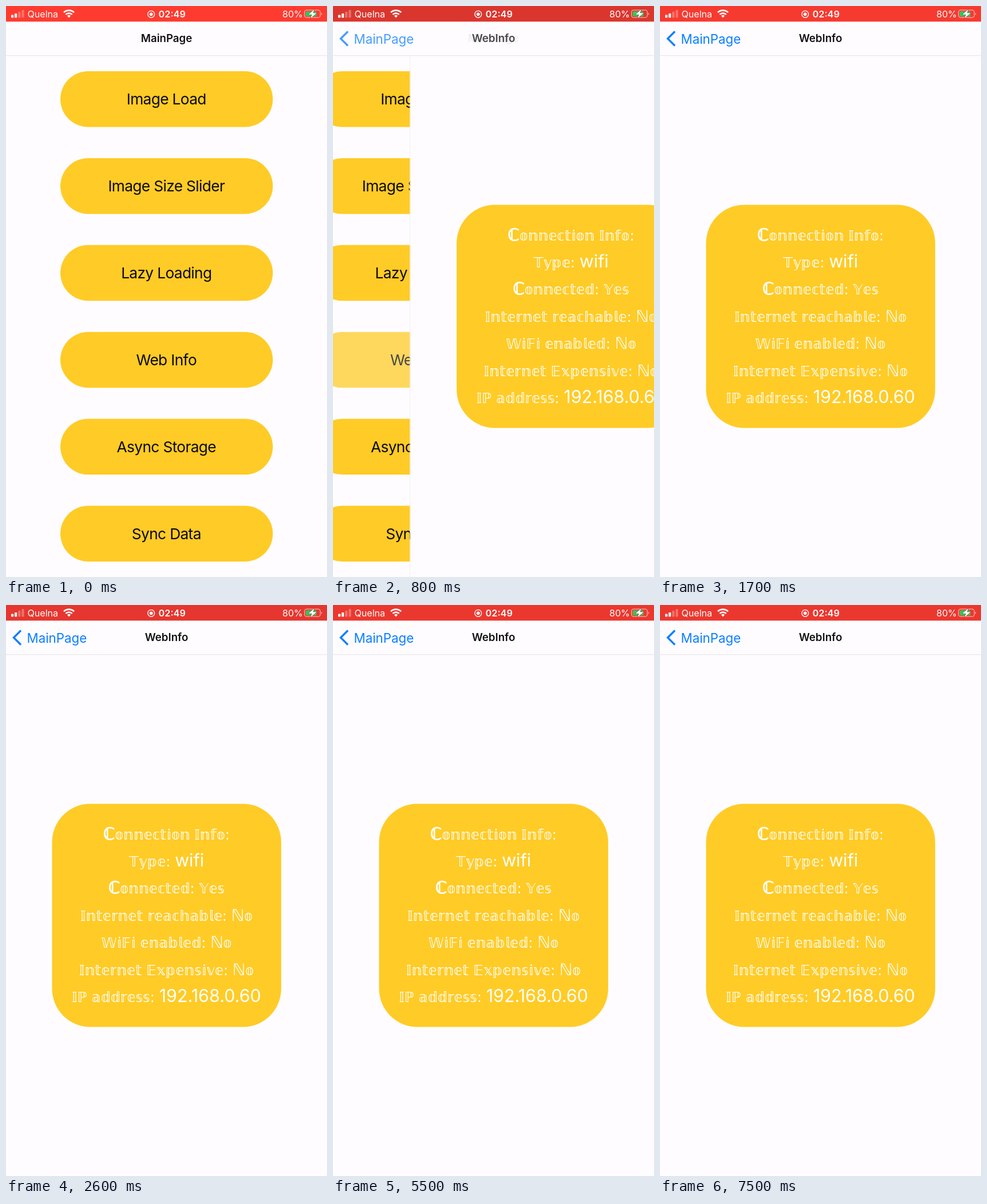
An HTML page that plays this animation: 561x998 px, repeating every 7600 ms.

```html
<!DOCTYPE html>
<html lang="en">
<head>
<meta charset="utf-8">
<title>WebInfo</title>
<style>
  html, body { margin: 0; width: 100%; height: 100%; overflow: hidden; background: #fefcff; }
  svg { display: block; width: 100%; height: 100%; font-family: Inter, "Open Sans", sans-serif; }
  .mid { text-anchor: middle; }
  .label { font-size: 26.3px; letter-spacing: -.65px; fill: #0c0a08; }
  .title { font-size: 18.7px; font-weight: 600; fill: #111; }
  .back { font-size: 22.3px; fill: #0a7eff; }
  .status { font-size: 16.1px; fill: #fff; }
  .clock { font-weight: 600; font-size: 16.3px; }
  .double { font-family: "DejaVu Sans", sans-serif; fill: #fff; }
  .tall { font-size: 28px; }
  .heavy { font-size: 29px; stroke: #fff; stroke-width: 1.2; }
  .plain { font: 30.5px Inter, sans-serif; }
</style>
</head>
<body>
<svg viewBox="0 0 561 998" preserveAspectRatio="none">
  <rect width="561" height="998" fill="#fefcff"/>
  <g id="menu"></g>

  <g id="page">
    <rect x="-1.5" y="87" width="1.5" height="911" fill="#f2f1f3"/>
    <rect y="87" width="562" height="911" fill="#fefcff"/>
    <rect x="80.5" y="347.5" width="400.4" height="390" rx="67" fill="#ffcb26"/>
    <g id="info"></g>
  </g>

  <rect y="27" width="561" height="60" fill="#fefcff"/>
  <rect y="86" width="561" height="1.3" fill="#e9e8eb"/>
  <text id="oldTitle" class="title mid" x="280.5" y="63">MainPage</text>
  <text id="newTitle" class="title mid" x="280.5" y="63">WebInfo</text>
  <g id="back">
    <path d="M26 44.5 13.5 57 26 69.5" fill="none" stroke="#0a7eff" stroke-width="3.4"/>
    <text class="back" x="36.5" y="65.7">MainPage</text>
  </g>

  <rect id="bar" width="561" height="27.3"/>
  <g fill="#fff">
    <rect x="9" y="15.5" width="4.2" height="5" rx="1"/>
    <rect x="15" y="13" width="4.2" height="7.5" rx="1"/>
    <rect x="21.2" y="10" width="4.2" height="10.5" rx="1" opacity=".3"/>
    <rect x="27.4" y="7" width="4.2" height="13.5" rx="1" opacity=".3"/>
  </g>
  <text class="status" x="37.5" y="20">Quelna</text>
  <g fill="none" stroke="#fff" stroke-width="2.7">
    <path d="M101 11.2a13 13 0 0 1 18 0"/>
    <path d="M104.4 14.9a8 8 0 0 1 11.2 0"/>
    <path d="M107 17.2a4.3 4.3 0 0 1 6 0L110 20.6Z" fill="#fff" stroke="none"/>
  </g>
  <circle cx="253.7" cy="14.3" r="5.9" fill="none" stroke="#fff" stroke-width="1.4"/>
  <circle cx="253.7" cy="14.3" r="2.9" fill="#fff"/>
  <text class="status clock" x="266.5" y="20">02:49</text>
  <text class="status" x="483" y="20">80%</text>
  <rect x="521.7" y="7.2" width="27.6" height="13" rx="3.8" fill="none" stroke="#fff" stroke-opacity=".6" stroke-width="1.3"/>
  <path d="M551 11.4q2.4 2.3 0 4.6Z" fill="#fff" opacity=".7"/>
  <rect x="523.8" y="9.2" width="18.8" height="9" rx="2" fill="#34c759"/>
  <path d="M539 5.5 528.5 14.9h6.2L532 21.7l11-9.5h-6.4Z" fill="#fff" stroke="#5b2a24" stroke-width="1" paint-order="stroke"/>
</svg>
<script>
const LOOP = 7600, STEP = 100, WIDTH = 561;
const PUSH = 650;       // touch released, new page slides in
const PRESS = 500;      // touch down
const STIFFNESS = 18.26; // critically damped spring rate, per second
const $ = id => document.getElementById(id);

const labels = ["Image Load", "Image Size Slider", "Lazy Loading", "Web Info", "Async Storage", "Sync Data"];
$("menu").innerHTML = labels.map((label, i) => `
  <g transform="translate(0 ${i * 151.9})">
    <rect x="95" y="114" width="371.3" height="97.5" rx="48.75" fill="#ffcb26"/>
    <text class="label mid" x="280.3" y="172">${label}</text>
  </g>`).join("");
const pressed = $("menu").children[3];

// Double-struck letters; a few capitals live outside the main block.
const early = { C: "ℂ", N: "ℕ", P: "ℙ" };
const doubled = text => text.replace(/[A-Za-z]/g, c =>
  early[c] || String.fromCodePoint(c.charCodeAt(0) + (c < "a" ? 0x1D538 - 65 : 0x1D552 - 97)));

const rows = [
  ["Connection Info:"],
  ["Type:", "wifi"],
  ["Connected: Yes"],
  ["Internet reachable: No"],
  ["WiFi enabled: No"],
  ["Internet Expensive: No"],
  ["IP address:", "192.168.0.60"]
];

// One type size for all rows, chosen so the longest label fits the card.
const pen = document.createElement("canvas").getContext("2d");
pen.font = '100px "DejaVu Sans", sans-serif';
const size = 100 * 256 / pen.measureText(doubled("Internet reachable:")).width;

const styled = text => doubled(text)
  .replace("ℂ", '<tspan class="heavy">ℂ</tspan>')
  .replace("ℕ", '<tspan class="tall">ℕ</tspan>');
$("info").innerHTML = rows.map(([text, value], i) => {
  const tail = value ? ` <tspan class="plain">${value}</tspan>` : "";
  return `<text class="double mid" font-size="${size.toFixed(2)}" x="280.5" y="${409.5 + i * 47.4}">${styled(text)}${tail}</text>`;
}).join("");

const clamp = x => Math.min(1, Math.max(0, x));
const easeInOut = x => x < .5 ? 2 * x * x : 1 - 2 * (1 - x) ** 2;
const mix = (a, b, k) => Math.round(a + (b - a) * k);
const slide = (el, x) => el.setAttribute("transform", `translate(${x.toFixed(2)} 0)`);

function draw(t) {
  const w = Math.max(0, t - PUSH) / 1000 * STIFFNESS;
  const left = (1 + w) * Math.exp(-w); // share of the slide still to go
  const done = 1 - left;
  slide($("page"), t < PUSH ? WIDTH + 40 : left < .0005 ? 0 : left * WIDTH);
  slide($("menu"), -.3 * WIDTH * done);

  const fade = t < PUSH ? easeInOut(clamp((t - PRESS) / 150)) : 1 - easeInOut(clamp((t - PUSH) / 250));
  pressed.setAttribute("opacity", 1 - .8 * fade);

  $("oldTitle").setAttribute("opacity", left ** 2);
  $("newTitle").setAttribute("opacity", done);
  $("back").setAttribute("opacity", done);

  const glow = .5 + .5 * Math.cos(t / 1000 * Math.PI);
  $("bar").setAttribute("fill", `rgb(${mix(215, 255, glow)},${mix(53, 59, glow)},${mix(46, 48, glow)})`);
}

const start = performance.now();
function tick() {
  const t = (performance.now() - start) % LOOP;
  draw(Math.floor(t / STEP) * STEP);
  requestAnimationFrame(tick);
}
tick();
</script>
</body>
</html>
```
